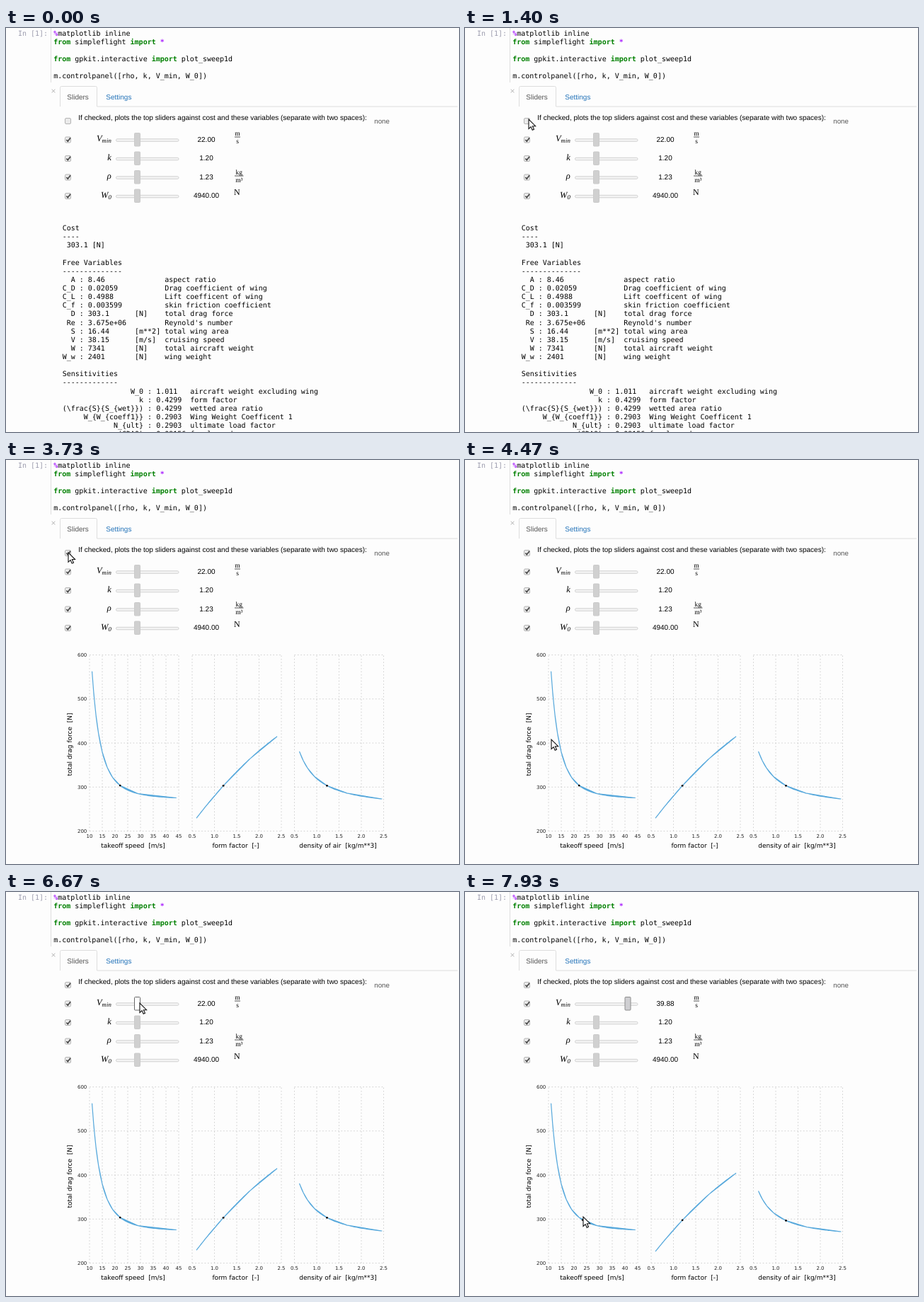
An HTML page that plays this animation: 640 by 571 pixels, repeating every 8 s.

```html
<!DOCTYPE html>
<html lang="en">
<head>
<meta charset="utf-8">
<title>Control panel</title>
<style>
  html, body { margin: 0; width: 100%; height: 100%; overflow: hidden; background: #fdfdfd; }
  svg { display: block; width: 640px; height: 571px; }
  text { white-space: pre; text-rendering: geometricPrecision; font: 10px Arial, "Liberation Sans", sans-serif; fill: #000; }
  .mono { font-family: "DejaVu Sans Mono", monospace; }
  .kw { fill: #008000; font-weight: bold; }
  .op { fill: #a2f; font-weight: bold; }
  .math { font: italic 12.5px "Liberation Serif", serif; }
  .unit { font: 9.5px "Liberation Serif", serif; }
  .tick { font: 7px "DejaVu Sans", sans-serif; fill: #222; }
  .axis { font: 9px "DejaVu Sans", sans-serif; }
  .end { text-anchor: end; }
  .mid { text-anchor: middle; }
  .line { fill: none; stroke: #ddd; }
  .grid { stroke: #c4c4c4; stroke-width: .8; stroke-dasharray: 1.6 2.8; }
  .curve { fill: #58a9dc; stroke: #58a9dc; stroke-width: 1.2; stroke-linejoin: round; }
  .thumb { fill: #d0d0d0; stroke: #cacaca; }
  .hover { fill: #cfcfd2; stroke: #8c8c8c; }
  .press { fill: #fff; stroke: #666; }
</style>
</head>
<body>
<svg id="stage" viewBox="0 0 640 571"></svg>
<script>
const stage = document.getElementById('stage');
const $ = id => document.getElementById(id);
const text = (x, y, s, cls = '', extra = '') => `<text x="${x}" y="${y}" class="${cls}" ${extra}>${s}</text>`;
const path = (d, cls, extra = '') => `<path d="${d}" class="${cls}" ${extra}/>`;
const kw = s => `<tspan class="kw">${s}</tspan>`;
const op = s => `<tspan class="op">${s}</tspan>`;

// Notebook cell and tabs
function header() {
  const code = [
    op('%') + 'matplotlib inline',
    `${kw('from')} simpleflight ${kw('import')} ${op('*')}`, '',
    `${kw('from')} gpkit.interactive ${kw('import')} plot_sweep1d`, '',
    'm.controlpanel([rho, k, V_min, W_0])'
  ];
  return path('M63.5 0V77', 'line') +
    text(17, 10.9, 'In [1]:', 'mono', 'style="fill:#9c9cae"') +
    code.map((s, i) => text(67.2, 10.5 + 12.15 * i, s, 'mono')).join('') +
    path('M76.5 111V84.5q0-2 2-2H126.5q2 0 2 2V111H638', 'line') +
    text(63.5, 93, '×', '', 'style="fill:#bbb;font-size:12px"') +
    text(86.3, 100.8, 'Sliders', '', 'style="fill:#555"') +
    text(141.3, 100.8, 'Settings', '', 'style="fill:#2272b8"');
}

const checkbox = (y, id = '') =>
  `<rect x="83.5" y="${y - 4}" width="8" height="8" rx="1.5" fill="#ebebeb" stroke="#b4b4b4" id="${id}"/>` +
  path(`M85.4 ${y}l1.9 2.2 3.7-5`, '', `id="${id}Mark" fill="none" stroke="#444" stroke-width="1.7"`);

const fraction = (y, top, bottom, w) =>
  text(323 + w / 2, y - 2, top, 'unit mid') + text(323 + w / 2, y + 9.3, bottom, 'unit mid') +
  path(`M323 ${y + .5}h${w}`, '', 'stroke="#222" stroke-width=".8"');

function controls() {
  const sub = s => `<tspan dy="2" font-size="8.8">${s}</tspan>`;
  const rows = [['V' + sub('min'), '22.00'], ['k', '1.20'], ['ρ', '1.23'], ['W' + sub('0'), '4940.00']];
  return checkbox(131.5, 'sweep') +
    text(102.3, 130.4, 'If checked, plots the top sliders against cost and these variables (separate with two spaces):') +
    text(520.3, 135, 'none', '', 'style="fill:#555;font-size:9.7px"') +
    rows.map(([label, value], i) => {
      const y = 158 + 26.5 * i;
      return checkbox(y) + text(148.8, y + 2, label, 'math end') +
        `<rect x="155.5" y="${y - 1.2}" width="88.5" height="3.5" rx="1.7" fill="#f4f4f4" stroke="#cdcdcd" stroke-width=".9"/>
         <rect id="thumb${i}" class="thumb" x="181.5" y="${y - 9.5}" width="8" height="18.5" rx="1"/>` +
        text(283, y + 2.5, value, 'mid', `id="value${i}"`);
    }).join('') +
    fraction(153.5, 'm', 's', 8) + fraction(208.5, 'kg', 'm³', 12.5) +
    text(322, 236, 'N', 'unit', 'style="font-size:12px"');
}

// Text report
function report() {
  const free = [
    ['A', '8.46', '', 'aspect ratio'],
    ['C_D', '0.02059', '', 'Drag coefficient of wing'],
    ['C_L', '0.4988', '', 'Lift coefficent of wing'],
    ['C_f', '0.003599', '', 'skin friction coefficient'],
    ['D', '303.1', '[N]', 'total drag force'],
    ['Re', '3.675e+06', '', "Reynold's number"],
    ['S', '16.44', '[m**2]', 'total wing area'],
    ['V', '38.15', '[m/s]', 'cruising speed'],
    ['W', '7341', '[N]', 'total aircraft weight'],
    ['W_w', '2401', '[N]', 'wing weight']
  ];
  const sens = [
    ['W_0', '1.011', 'aircraft weight excluding wing'],
    ['k', '0.4299', 'form factor'],
    ['(\\frac{S}{S_{wet}})', '0.4299', 'wetted area ratio'],
    ['W_{W_{coeff1}}', '0.2903', 'Wing Weight Coefficent 1'],
    ['N_{ult}', '0.2903', 'ultimate load factor'],
    ['(CDA0)', '0.09156', 'fuselage drag area']
  ];
  const lines = ['Cost', '----', ' 303.1 [N]', '', 'Free Variables', '-'.repeat(14),
    ...free.map(([n, v, u, d]) => n.padStart(3) + ' : ' + v.padEnd(11) + u.padEnd(7) + d), '',
    'Sensitivities', '-'.repeat(13),
    ...sens.map(([n, v, d]) => n.padStart(19) + ' : ' + v.padEnd(8) + d)];
  return lines.map((s, i) => text(79.7, 286.1 + 12.13 * i, s, 'mono')).join('');
}

// Plots
const plotY = v => 524.5 - (v - 200) * .6225;
const panels = [
  { x: 118, lo: 10, step: 5, ticks: 8, unit: 3.6, label: 'takeoff speed  [m/s]' },
  { x: 263, lo: .5, step: .5, ticks: 5, unit: 63, label: 'form factor  [-]' },
  { x: 407.5, lo: .5, step: .5, ticks: 5, unit: 63, label: 'density of air  [kg/m**3]' }
];
const plotX = (p, v) => p.x + (v - p.lo) * p.unit;

const decay = (base, amp, from, power) => v => base + amp * (from / v) ** power;
const bend = (start, slope) => k => start + slope * (k - .6) - 16 * (k - .6) * (k - 1.2);
const before = [
  { f: decay(272, 290, 11, 3.2), knots: [11, 11.7, 12.5, 13.5, 15, 17, 19, 22, 29, 44], at: 22 },
  { f: bend(230, 121.7), knots: [.6, .8, 1.2, 1.8, 2.4], at: 1.2 },
  { f: decay(254, 126, .615, 1.36), knots: [.615, .7, .8, .95, 1.23, 1.7, 2.46], at: 1.23 }
];
const after = [
  { ...before[0], at: 23.4 },
  { ...before[1], f: bend(227, 117.5) },
  { ...before[2], f: decay(256.4, 106.6, .615, 1.41) }
];

// Fills the sliver between a smooth curve and its chords
function curve(p, { f, knots, at }) {
  const pt = v => plotX(p, v).toFixed(1) + ' ' + plotY(f(v)).toFixed(1);
  const [a, b] = [knots[0], knots.at(-1)];
  const fine = Array.from({ length: 61 }, (_, i) => pt(a + (b - a) * i / 60));
  return path('M' + [...fine, ...knots.map(pt).reverse()].join('L') + 'Z', 'curve') +
    `<circle cx="${plotX(p, at)}" cy="${plotY(f(at))}" r="1.4"/>`;
}

function axes() {
  let s = text(0, 0, 'total drag force  [N]', 'axis mid', 'transform="translate(93 402) rotate(-90)"');
  for (let v = 200; v <= 600; v += 100) s += text(114.3, plotY(v) + 2.6, v, 'tick end');
  for (const p of panels) {
    for (let v = 200; v <= 600; v += 100) s += path(`M${p.x} ${plotY(v)}h126`, 'grid');
    for (let i = 0; i < p.ticks; i++) {
      const v = p.lo + i * p.step, x = plotX(p, v);
      s += path(`M${x} 524.5V275.5`, 'grid') + text(x, 534.3, p.step < 1 ? v.toFixed(1) : v, 'tick mid');
    }
    s += text(p.x + 61.5, 548, p.label, 'axis mid');
  }
  return s;
}

const curves = set => panels.map((p, i) => curve(p, set[i])).join('');
stage.innerHTML = header() + controls() +
  `<g id="report">${report()}</g>
   <g id="plots">${axes()}<g id="before">${curves(before)}</g><g id="after">${curves(after)}</g></g>` +
  path('M0 0V13.5L3.1 10.6 5.2 15.3 7.5 14.3 5.4 9.7H9.6Z', '',
    'id="cursor" fill="#fff" stroke="#111" stroke-width="1.1"');

// Pointer track: time, x, y
const track = [
  [67, 585, 277], [333, 354, 277], [600, 354, 277], [930, 230, 185], [1200, 93, 78], [1400, 90, 129],
  [1470, 90, 129], [1667, 88, 131], [3733, 88, 131], [3933, 84, 41], [4133, 84, 41], [4400, 83, 330],
  [4600, 200, 525], [4733, 505, 531], [5000, 183, 178], [6133, 183, 178], [6467, 183, 158], [6600, 183, 158],
  [6667, 189, 157], [7000, 231, 157], [7200, 231, 157], [7533, 231, 443], [7667, 231, 443], [7933, 167, 459]
];
const clamp = v => Math.min(1, Math.max(0, v));
function pointer(t) {
  const i = track.findIndex(k => k[0] >= t);
  if (i < 1) return track.at(i).slice(1);
  const [a, b] = [track[i - 1], track[i]], u = (t - a[0]) / (b[0] - a[0]);
  return [a[1] + (b[1] - a[1]) * u, a[2] + (b[2] - a[2]) * u];
}

const show = (id, on) => $(id).style.display = on ? '' : 'none';
const FRAME = 200 / 3;

function draw(now) {
  const t = Math.floor((now % 8000 + 5) / FRAME) * FRAME;
  const plotted = t > 3700, updated = t > 7700;
  show('report', !plotted);
  show('plots', plotted);
  show('before', !updated);
  show('after', updated);

  show('sweepMark', t > 2500);
  $('sweep').setAttribute('fill', t > 2440 && t < 2500 ? '#ccc' : '#ebebeb');

  const v = 22 + 17.88 * clamp((t - 6667) / 333);
  $('value0').textContent = v.toFixed(2);
  $('thumb0').setAttribute('x', 181.5 + (v - 22) * 2.489);
  $('thumb0').setAttribute('class', t < 6300 ? 'thumb' : t > 6640 && t < 7240 ? 'press' : 'hover');
  $('thumb1').setAttribute('class', t > 4970 && t < 6230 ? 'hover' : 'thumb');

  const [x, y] = pointer(t);
  show('cursor', t > 50 && !(t > 5040 && t < 5300));
  $('cursor').setAttribute('transform', `translate(${x} ${y})`);
}

const start = performance.now();
function loop() {
  draw(performance.now() - start);
  requestAnimationFrame(loop);
}
loop();
</script>
</body>
</html>
```
